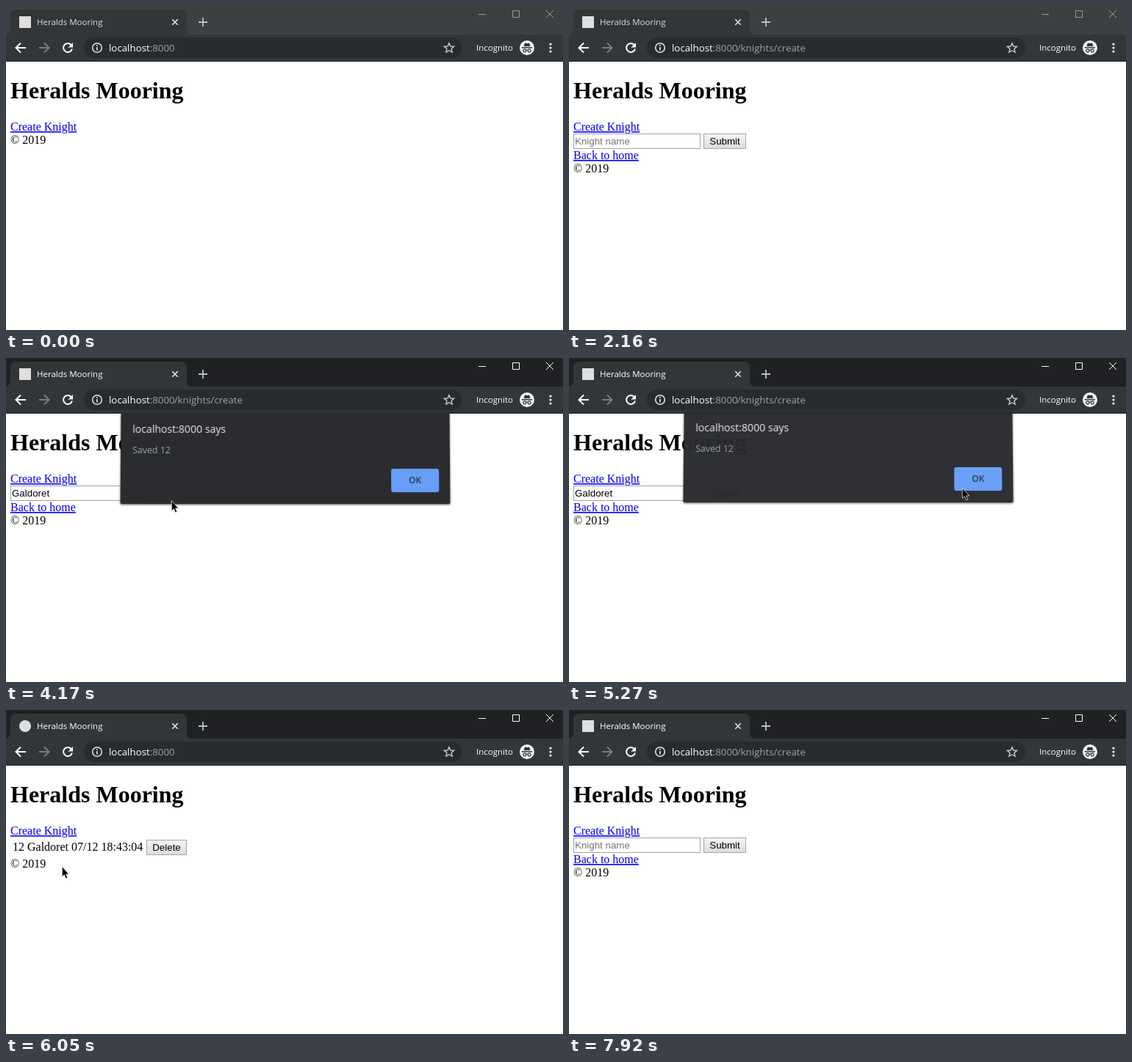
An HTML page that plays this animation: 758x442 px, repeating every 8 s.

```html
<!DOCTYPE html>
<html lang="en">
<head>
<meta charset="utf-8">
<title>Heralds Mooring</title>
<style>
  html, body { margin: 0; width: 100%; height: 100%; overflow: hidden; background: #fff; }
  svg { position: absolute; left: 0; top: 0; width: 758px; height: 442px; }
  text { white-space: pre; }
  .ui { font-family: "Open Sans", "Noto Sans", sans-serif; }
  .serif { font: 16px "Liberation Serif", "Times New Roman", serif; }
  .form { font: 13.333px "Liberation Sans", Arial, sans-serif; }
  .link { fill: #00e; text-decoration: underline; }
  .line { fill: none; stroke: #fff; stroke-width: 2; }
  .btn { fill: url(#face); stroke: #a6a6a6; }

  /* every state change shares one 8 s clock */
  .st { animation: 8s step-end infinite; }

  /* window focus */
  #bar { animation-name: focus; }
  @keyframes focus {
    0%, 27% { --bar: #3c4043; --ctl: #989a9d; --name: #dcdee0; }
    12.5%, 34.75% { --bar: #202124; --ctl: #fff; --name: #fff; }
  }
  .ctl { fill: none; stroke: var(--ctl); }
  #icon { animation-name: loading; }
  @keyframes loading {
    0%, 17.5%, 76.625%, 98% { rx: 0; }
    13.5%, 73.5%, 94.125% { rx: 8px; }
  }

  /* pages */
  #home { animation-name: home; }
  #list { animation-name: list; }
  .create { animation-name: create; }
  @keyframes home { 0% { opacity: 1; } 13.5%, 100% { opacity: 0; } }
  @keyframes list { 0%, 94.125%, 100% { opacity: 0; } 74.5% { opacity: 1; } }
  @keyframes create { 0%, 74.5% { opacity: 0; } 13.5%, 94.125%, 100% { opacity: 1; } }

  /* text field */
  #hint { animation-name: hint; }
  #focus { animation-name: field; }
  #caret { animation-name: caret; }
  #typing { animation-name: typing; }
  @keyframes hint { 0%, 75% { opacity: 1; } 35.75% { opacity: 0; } }
  @keyframes field { 0%, 49.25%, 100% { opacity: 0; } 34.75% { opacity: 1; } }
  @keyframes caret { 0%, 42.625%, 100% { opacity: 0; } 34.75% { opacity: 1; } }
  @keyframes typing {
    0%, 75%, 100% { transform: translateX(0); }
    35.75% { transform: translateX(10.4px); }
    36.6% { transform: translateX(17.8px); }
    37.4% { transform: translateX(20.8px); }
    38.2% { transform: translateX(28.2px); }
    39% { transform: translateX(35.6px); }
    39.8% { transform: translateX(40px); }
    40.6% { transform: translateX(47.4px); }
    41.45% { transform: translateX(51.1px); }
  }

  /* alert box */
  #alert {
    position: absolute; left: 156px; top: 76px; width: 448px; height: 124px;
    background: #292a2d; box-shadow: 0 1px 3px rgba(0, 0, 0, .65);
    border-radius: 0 0 2px 2px; opacity: 0; animation-name: alert;
  }
  #alert span { position: absolute; left: 16px; line-height: 20px; white-space: nowrap; }
  #alert .head { top: 12px; font-size: 14.1px; color: #e8eaed; }
  #alert .msg { top: 41px; font-size: 12.4px; color: #9aa0a6; }
  #alert .ok {
    left: 368px; top: 76px; width: 65px; line-height: 32px; text-align: center;
    font-size: 12px; font-weight: 600; color: #2a3648; background: #669df6; border-radius: 3px;
  }
  @keyframes alert {
    0%, 67.875%, 100% { opacity: 0; transform: perspective(500px) translateY(-20px) rotateX(20deg); }
    50.125% { opacity: .3; transform: perspective(500px) translateY(-14px) rotateX(10deg); }
    51.125% { opacity: .8; transform: perspective(500px) translateY(-5px) rotateX(4deg); }
    52.125% { opacity: .993; transform: perspective(500px) translateY(-1px) rotateX(1deg); }
    53.125%, 65.125% { opacity: 1; transform: none; }
    65.875% { opacity: .975; transform: perspective(500px) translateY(-3px) rotateX(1.2deg); }
    66.875% { opacity: .45; transform: perspective(500px) translateY(-12px) rotateX(9deg); }
  }

  /* pointer */
  #pointer { animation: path 8s step-end infinite; }
  #arrow { animation-name: arrow; }
  #hand { animation-name: hand; }
  #beam { animation-name: beam; }
  @keyframes path {
    0% { transform: translate(591px, 420px); }
    1.625% { transform: translate(591px, 420px); animation-timing-function: steps(5); }
    6.5625% { transform: translate(220px, 225px); animation-timing-function: steps(5); }
    11.5% { transform: translate(84px, 165px); }
    14.5% { transform: translate(84px, 165px); animation-timing-function: steps(5); }
    19.125% { transform: translate(580px, 369px); }
    31.75% { transform: translate(640px, 280px); animation-timing-function: steps(3); }
    34.75% { transform: translate(131px, 193px); }
    42.625% { transform: translate(131px, 193px); animation-timing-function: steps(5); }
    47.375% { transform: translate(224px, 192px); }
    49.25% { transform: translate(225px, 194px); }
    53.25% { transform: translate(225px, 194px); animation-timing-function: steps(3); }
    56.125% { transform: translate(333px, 179px); }
    57.375% { transform: translate(333px, 179px); animation-timing-function: steps(3); }
    60% { transform: translate(605px, 165px); }
    61.125% { transform: translate(605px, 165px); animation-timing-function: steps(3); }
    63.875% { transform: translate(535px, 177px); }
    66.875% { transform: translate(535px, 177px); animation-timing-function: steps(5); }
    71.625% { transform: translate(70px, 205px); }
    74.5% { transform: translate(76px, 213px); }
    75.625% { transform: translate(76px, 213px); animation-timing-function: steps(2); }
    77.625% { transform: translate(46px, 225px); }
    78.625% { transform: translate(46px, 225px); animation-timing-function: steps(6); }
    84.5% { transform: translate(152px, 174px); }
    85.5% { transform: translate(152px, 174px); animation-timing-function: steps(5); }
    90.25% { transform: translate(54px, 169px); }
    94.125% { transform: translate(54px, 169px); animation-timing-function: steps(5); }
    99%, 100% { transform: translate(518px, 378px); }
  }
  @keyframes arrow {
    0%, 11.5%, 19.125%, 34.75%, 71.625%, 89.3%, 99%, 100% { opacity: 0; }
    1.625%, 15.425%, 31.75%, 44.5%, 74.5%, 95.1% { opacity: 1; }
  }
  @keyframes hand {
    0%, 15.425%, 74.5%, 95.1%, 100% { opacity: 0; }
    11.5%, 71.625%, 89.3% { opacity: 1; }
  }
  @keyframes beam { 0%, 44.5%, 100% { opacity: 0; } 34.75% { opacity: 1; } }
</style>
</head>
<body>
<svg viewBox="0 0 758 442">
  <defs>
    <linearGradient id="face" x2="0" y2="1">
      <stop stop-color="#f4f4f4"/><stop offset="1" stop-color="#dcdcdc"/>
    </linearGradient>
  </defs>

  <!-- page -->
  <text class="serif" x="6" y="126" style="font-size:32px;font-weight:700">Heralds Mooring</text>
  <text class="serif link" x="6" y="170">Create Knight</text>

  <text id="home" class="serif st" x="6" y="188">© 2019</text>

  <g id="list" class="st">
    <text class="serif" y="192"><tspan x="9">12</tspan><tspan x="29">Galdoret</tspan><tspan x="89">07/12 18:43:04</tspan></text>
    <rect class="btn" x="191.5" y="177.5" width="54" height="20"/>
    <text class="form" x="218.5" y="192" text-anchor="middle">Delete</text>
    <text class="serif" x="6" y="215">© 2019</text>
  </g>

  <g class="create st">
    <rect x="6.5" y="174.5" width="172" height="20" fill="#fff" stroke="#a0a0a0"/>
    <text class="form" x="8" y="189">Galdoret</text>
    <g id="typing" class="st">
      <rect x="8" y="176" width="56" height="17" fill="#fff"/>
      <path id="caret" class="st" d="M8.5 177V192" stroke="#000"/>
    </g>
    <text id="hint" class="form st" x="8" y="189" fill="#757575">Knight name</text>
    <rect id="focus" class="st" x="6.5" y="174.5" width="172" height="20" rx="1" fill="none" stroke="#5b8fd6" stroke-width="1.4"/>
    <rect class="btn" x="183.5" y="174.5" width="57" height="20"/>
    <text class="form" x="212" y="189" text-anchor="middle">Submit</text>
    <text class="serif link" x="6" y="209">Back to home</text>
    <text class="serif" x="6" y="227">© 2019</text>
  </g>

  <!-- browser window -->
  <g id="bar" class="ui st">
    <rect width="758" height="39" style="fill:var(--bar)"/>
    <path d="M-2 39Q6 39 6 31V13Q6 5 14 5H238Q246 5 246 13V31Q246 39 254 39V40H-2Z" fill="#323639"/>
    <rect id="icon" class="st" x="18" y="14" width="16" height="16" fill="#dedede"/>
    <text x="42" y="26" font-size="11.5" style="fill:var(--name)">Heralds Mooring</text>
    <path d="M226.3 18.3l7.4 7.4m0-7.4l-7.4 7.4" stroke="#e3e4e6" stroke-width="1.6"/>
    <path d="M262 22h12m-6-6v12" stroke="#bdc1c6" stroke-width="1.8"/>
    <path class="ctl" d="M643 11.5h10M689.5 6.5h9v9h-9zM735 6l10 10m0-10l-10 10"/>

    <rect y="39" width="758" height="37" fill="#323639"/>
    <path d="M0 75.5H758" stroke="#292c2f"/>
    <path class="line" d="M27 57H14M20 50.5L13.5 57 20 63.5"/>
    <path class="line" d="M45 57H58M52 50.5L58.5 57 52 63.5" style="stroke:#7b7e81"/>
    <path class="line" d="M88.6 53A6 6 0 1 0 89.9 58.4"/>
    <path d="M91 50v6.6h-6.6z" fill="#fff"/>
    <rect x="106" y="43" width="515" height="28" rx="14" fill="#282c2f"/>
    <circle class="line" cx="124" cy="57" r="6.3" style="stroke:#e8eaed;stroke-width:1.5"/>
    <path d="M124 56v4.5M124 53v1.7" stroke="#e8eaed" stroke-width="1.6"/>
    <text x="140" y="62" font-size="13.3" fill="#9aa0a6"><tspan fill="#fff">localhost</tspan>:8000</text>
    <text class="create st" x="228.7" y="62" font-size="13.3" fill="#9aa0a6">/knights/create</text>
    <path d="M603 50.6l1.9 4.4 4.7.4-3.6 3.1 1.1 4.6-4.1-2.4-4.1 2.4 1.1-4.6-3.6-3.1 4.7-.4z" fill="none" stroke="#c6c9cd" stroke-width="1.4"/>
    <text x="640" y="61" font-size="11.5" fill="#fff">Incognito</text>
    <circle cx="709" cy="57" r="10" fill="#f1f3f4"/>
    <path d="M702 56h14v1.4h-14zM704.4 55l1.6-4.6 3 .6 3-.6 1.6 4.6z" fill="#323639"/>
    <path d="M707.9 60.4q1.1-.8 2.2 0" fill="none" stroke="#323639" stroke-width="1.1"/>
    <g fill="none" stroke="#323639" stroke-width="1.2">
      <circle cx="705.8" cy="60.8" r="2"/><circle cx="712.2" cy="60.8" r="2"/>
    </g>
    <g fill="#fff">
      <circle cx="741" cy="52" r="1.6"/><circle cx="741" cy="57" r="1.6"/><circle cx="741" cy="62" r="1.6"/>
    </g>
  </g>
</svg>

<div id="alert" class="ui st">
  <span class="head">localhost:8000 says</span>
  <span class="msg">Saved 12</span>
  <span class="ok">OK</span>
</div>

<svg viewBox="0 0 758 442">
  <g id="pointer">
    <path id="arrow" class="st" d="M.3 .5V14.5L3.3 11.8 5.6 17 7.8 16 5.6 11H9.6Z" stroke="#fff" stroke-width=".7"/>
    <path id="hand" class="st" d="M-1.5 1.5Q0 -.5 1.5 1.5V7Q3.5 6 4.5 7.8 6.5 7 7.3 8.8 9.6 8.2 10 10.5V15Q10 18 8 20V21.5H-1V20L-5.5 13Q-6 10.5 -4 10.8L-1.5 13Z" stroke="#fff" stroke-width=".8"/>
    <path id="beam" class="st" d="M-3 -7.5H-1L0 -6.5 1 -7.5H3M0 -6.5V6.5M-3 7.5H-1L0 6.5 1 7.5H3" fill="none" stroke="#000" stroke-width="1.2"/>
  </g>
</svg>
</body>
</html>
```
